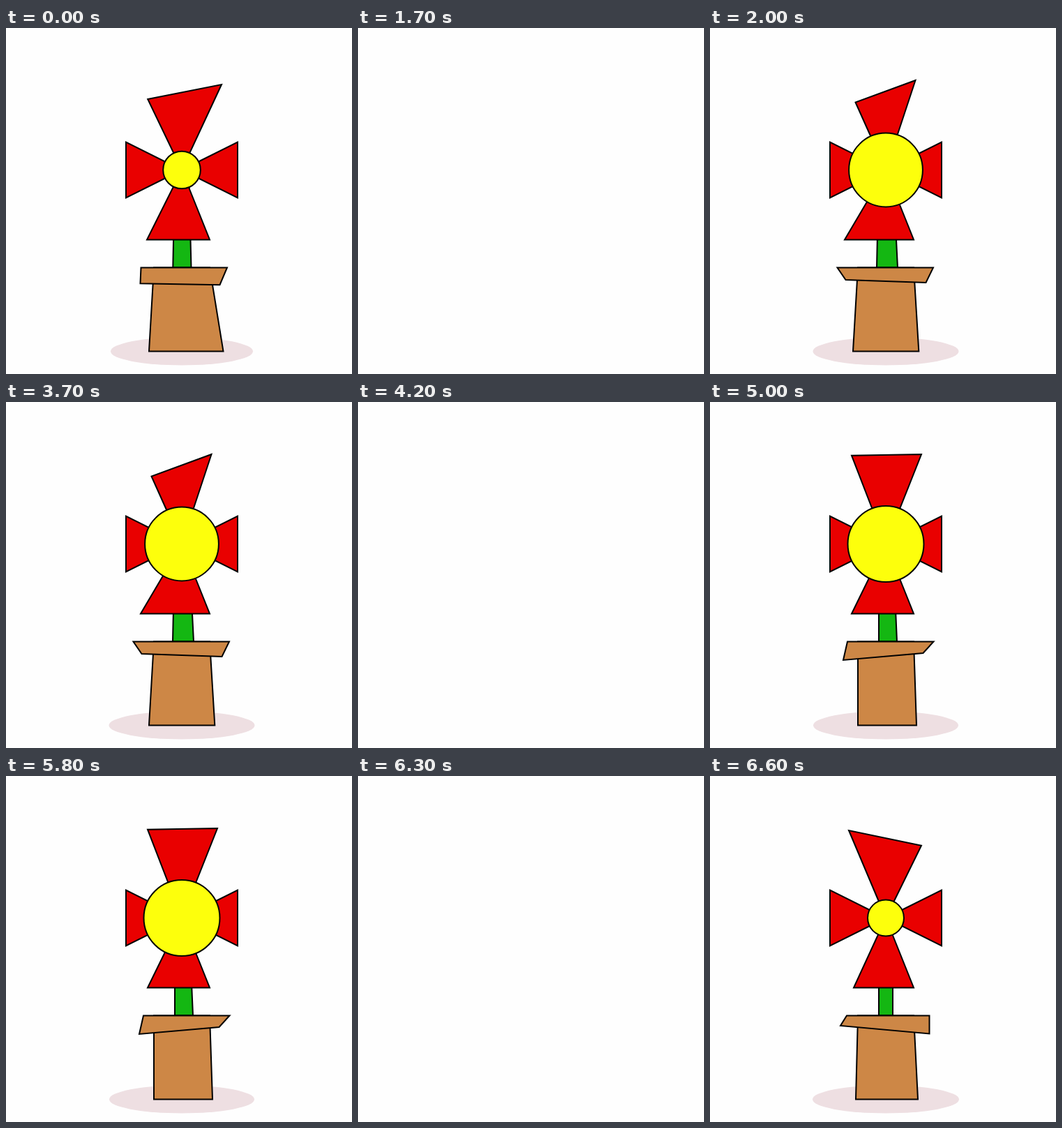
Animation, 496 px wide and 496 px high, one loop 7.2 s. Source, as an HTML page:

```html
<!DOCTYPE html>
<html lang="en">
<head>
<meta charset="utf-8">
<title>Flower pot</title>
<style>
  html, body { margin: 0; width: 100%; height: 100%; overflow: hidden; background: #fefefe; }
  svg { display: block; width: 100%; height: 100%; }
  g { stroke: #000; stroke-width: 2; }
</style>
</head>
<body>
<svg id="stage" viewBox="0 0 496 496"></svg>
<script>
const LOOP = 7200;
const CX = 252, CY = 203.5, PETAL_Y = 303.5, RIM_Y = 343.5, GROUND_Y = 463.5;
const RED = '#e90000', YELLOW = '#fdff0c', GREEN = '#14b712', CLAY = '#cd8746', SHADOW = '#eedfe2';

// Each flower is visible from start to end; only its loose corners vary.
const flowers = [
  { start: 0, end: 1700, shadow: 102, disc: 26.8, top: [203.2, 102, 309, 81], bottom: 202,
    stem: [239.3, 265.5], pot: [205, 311.5], rim: [193.5, 317], lip: [306.5, 368.2, 192.5, 366.3] },
  { start: 1800, end: 4200, shadow: 104.5, disc: 52.9, top: [208.5, 106.5, 294.5, 75], bottom: 193,
    stem: [239, 269], pot: [205, 299.3], rim: [182.5, 320], lip: [309.5, 365, 194.5, 361] },
  { start: 4300, end: 6300, shadow: 104, disc: 54.5, top: [203, 76.7, 303, 75], bottom: 203,
    stem: [242, 268], pot: [212, 296], rim: [197, 320.5], lip: [305.5, 360, 191, 370] },
  { start: 6400, end: LOOP, shadow: 105, disc: 26, top: [199, 78, 303, 99.7], bottom: 206,
    stem: [242, 262], pot: [209, 298], rim: [196, 314.5], lip: [314.5, 369.5, 187, 358] }
];

const poly = (fill, ...points) => `<polygon fill="${fill}" points="${points.join(' ')}"/>`;
const petal = (...ends) => poly(RED, CX, CY, ...ends);

function draw(f) {
  const [stemL, stemR] = f.stem, [potL, potR] = f.pot, [rimL, rimR] = f.rim;
  return '<g>' +
    `<ellipse cx="${CX}" cy="${GROUND_Y}" rx="${f.shadow}" ry="20" fill="${SHADOW}" stroke="none"/>` +
    poly(GREEN, 242, CY, 262, CY, stemR, RIM_Y, stemL, RIM_Y) +
    poly(CLAY, 212, RIM_Y, 292, RIM_Y, potR, GROUND_Y, potL, GROUND_Y) +
    poly(CLAY, rimL, RIM_Y, rimR, RIM_Y, ...f.lip) +
    petal(...f.top) +
    petal(332, CY - 40, 332, CY + 40) +
    petal(292, PETAL_Y, f.bottom, PETAL_Y) +
    petal(172, CY + 40, 172, CY - 40) +
    `<circle cx="${CX}" cy="${CY}" r="${f.disc}" fill="${YELLOW}"/>` +
    '</g>';
}

const stage = document.getElementById('stage');
stage.innerHTML = flowers.map(draw).join('');
const groups = [...stage.children];
const origin = performance.now();

function render(now) {
  const t = Math.max(0, now - origin) % LOOP;
  flowers.forEach((f, i) => {
    groups[i].style.display = t >= f.start && t < f.end ? '' : 'none';
  });
  requestAnimationFrame(render);
}
render(origin);
</script>
</body>
</html>
```
